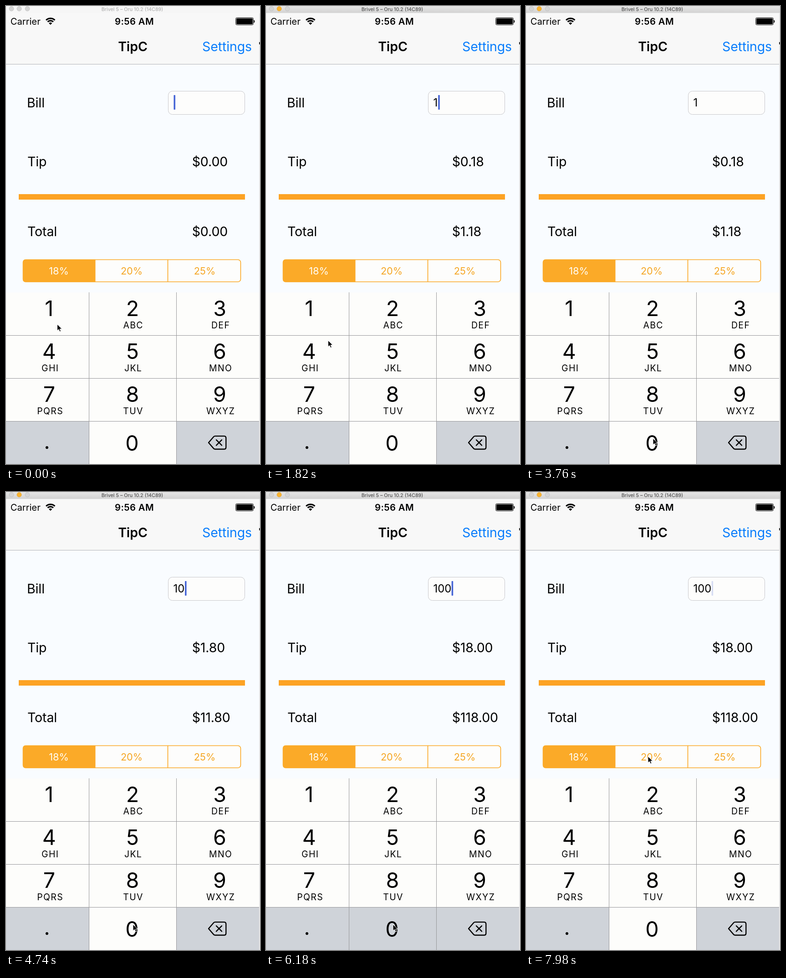
Animation, 558 px wide and 1003 px high, one loop 8000 ms. Source, as an HTML page:

```html
<!DOCTYPE html>
<html lang="en">
<head>
<meta charset="utf-8">
<title>Tip calculator</title>
<style>
  html, body { margin: 0; width: 100%; height: 100%; overflow: hidden; background: #f9fcff; }
  svg { display: block; font-family: Inter, Roboto, sans-serif; }
  .label { font-size: 28.5px; letter-spacing: -.1px; }
  .status { font-size: 20.2px; }
  .mid { text-anchor: middle; }
  .bold { font-weight: 600; }
  .segment { font-size: 21.7px; fill: #f5a623; text-anchor: middle; }
  .digit { font-size: 46.5px; text-anchor: middle; }
  .letters { font-size: 19.4px; letter-spacing: 1.4px; text-anchor: middle; }
</style>
</head>
<body>
<svg width="558" height="1003" viewBox="0 0 558 1003">
  <defs>
    <linearGradient id="chrome" x2="0" y2="1">
      <stop stop-color="#e6e6e6"/><stop offset="1" stop-color="#d2d2d2"/>
    </linearGradient>
  </defs>
  <rect width="558" height="1003" fill="#f9fcff"/>

  <!-- window title bar -->
  <rect id="bar" width="558" height="15.5"/>
  <g fill="#d4d4d4" stroke="#bdbdbd" stroke-width=".8">
    <circle cx="12" cy="6" r="5"/><circle id="light" cx="29" cy="6" r="5"/><circle cx="47" cy="6" r="5"/>
  </g>
  <text id="title" class="mid" x="277.5" y="10.5" font-size="10.8">Brivel 5 – Oru 10.2 (14C89)</text>

  <!-- status and navigation -->
  <rect y="15.5" width="558" height="111.5" fill="#f8f8f8"/>
  <rect y="127" width="556" height="1" fill="#b2b2b6"/>
  <text class="status" x="9.7" y="41">Carrier</text>
  <path d="M88 31A14 14 0 0 1 107.4 31M91.5 34.7A8.8 8.8 0 0 1 103.9 34.7" fill="none" stroke="#000" stroke-width="3.1"/>
  <path d="M97.7 41.3L94 37.5A5.2 5.2 0 0 1 101.4 37.5Z"/>
  <text class="status mid bold" x="282" y="41" letter-spacing=".4">9:56 AM</text>
  <rect x="504.5" y="25.5" width="39" height="16" rx="3" fill="none" stroke="#000"/>
  <rect x="506" y="27" width="36" height="13" rx="1.5"/>
  <path d="M545 31Q547.4 33.5 545 36.5Z" stroke="#000"/>
  <text class="label mid bold" x="278.5" y="99">TipC</text>
  <text class="label" x="431" y="99" fill="#087dfc">Settings</text>

  <!-- form -->
  <text class="label" x="46" y="222">Bill</text>
  <text class="label" x="47" y="350.5">Tip</text>
  <text class="label" x="47" y="503.5">Total</text>
  <rect x="356.5" y="186.5" width="168" height="51" rx="9" fill="#fdfdfc" stroke="#c8c8cc"/>
  <text id="bill" x="367.5" y="220" font-size="23.8"></text>
  <rect id="caret" y="195" width="3.6" height="32" rx="1" fill="#4867d6"/>
  <text id="tip" class="label" x="408.7" y="350.5"></text>
  <text id="total" class="label" x="408.7" y="503.5"></text>
  <rect x="28" y="412" width="497" height="12" fill="#fda324"/>

  <!-- percentage choice -->
  <rect x="37.5" y="555.5" width="478" height="48.5" rx="6" fill="#fdfdfc" stroke="#fbaa28" stroke-width="1.7"/>
  <path d="M196.5 555H43Q37 555 37 561V598.5Q37 604.5 43 604.5H196.5Z" fill="#fbaa28"/>
  <path d="M355.5 556V604" stroke="#fbaa28" stroke-width="1.7"/>
  <text class="segment" x="116" y="588" style="fill:#fffdf6">18%</text>
  <text class="segment" x="276" y="588">20%</text>
  <text class="segment" x="436.5" y="588">25%</text>

  <g id="pad"></g>
  <g fill="none" stroke="#000" stroke-width="2.4" stroke-linejoin="round" stroke-linecap="round">
    <path d="M445 956.2L456 943.5Q457.4 941.9 459.5 941.9H479Q483.3 941.9 483.3 946.2V966.2Q483.3 970.5 479 970.5H459.5Q457.4 970.5 456 968.9Z"/>
    <path d="M462 950.2L474 962.2M474 950.2L462 962.2"/>
  </g>
  <rect x="556" y="16" width="2" height="987" fill="#e9e9e9"/>
  <rect x="556" y="79" width="2" height="5" fill="#333"/>

  <path id="cursor" d="M0 0V14L3.3 11L5.6 16.2L8 15.2L5.8 10.2H10.3Z" stroke="#fff"/>
</svg>
<script>
const $ = id => document.getElementById(id);
const LOOP = 8000, WHITE = '#fdfdfb', GREY = '#cfd3d9';

// Keypad: column edges, then one entry per key
const edges = [0, 182, 374, 556], digitX = [94.8, 278, 469.5], lettersX = [97.2, 279.6, 471.6];
const keys = [['1', ''], ['2', 'ABC'], ['3', 'DEF'], ['4', 'GHI'], ['5', 'JKL'], ['6', 'MNO'],
  ['7', 'PQRS'], ['8', 'TUV'], ['9', 'WXYZ'], ['.', ''], ['0', ''], ['', '']];
let pad = '';
keys.forEach(([digit, letters], i) => {
  const c = i % 3, r = (i - c) / 3, y = r * 94;
  const fill = digit === '.' || !digit ? GREY : WHITE;
  const x = digit === '.' ? 90 : digitX[c] - (r === 3 ? 1 : 0);
  pad += `<rect id="key${digit}" x="${edges[c]}" y="${627.5 + y}" width="${edges[c + 1] - edges[c]}" height="94" fill="${fill}"/>
    <text class="digit" x="${x}" y="${r === 3 ? (digit === '.' ? 970 : 974) : 679 + y}">${digit}</text>
    <text class="letters" x="${lettersX[c]}" y="${706 + y}">${letters}</text>`;
});
pad += '<path d="M0 721.5H556M0 815.5H556M0 909.5H556M182.5 627V1003M374.5 627V1003" stroke="#97979a" fill="none"/>';
$('pad').innerHTML = pad;

// All moments below are ticks; three ticks last 20, 20 and 100 ms
const focusAt = 10;
const presses = [
  { key: '1', down: 12, type: 16, up: 28 },
  { key: '0', down: 85, type: 88, up: 96 },
  { key: '0', down: 120, type: 124, up: 138 }];
const moves = [
  { from: 35, to: 56, x: 279, y: 944 },
  { from: 62, to: 70, x: 279, y: 947 },
  { from: 144, to: 167, x: 268, y: 579 }];
const caretX = [368.4, 378.2, 393, 407.6];

function tickAt(ms) {
  const u = ms + 20, r = u % 140;
  return 3 * Math.floor(u / 140) + (r < 20 ? 0 : r < 40 ? 1 : 2);
}
const ramp = (n, from, to) => Math.min(1, Math.max(0, (n - from) / (to - from)));
const ease = p => p * p * (3 - 2 * p);

function draw(now) {
  const n = tickAt(now % LOOP);

  const active = n >= focusAt;
  $('bar').setAttribute('fill', active ? 'url(#chrome)' : '#f6f6f6');
  $('title').setAttribute('fill', active ? '#3c3c3c' : '#a8a8a8');
  $('light').setAttribute('fill', active ? '#f9b32f' : '#d4d4d4');
  $('light').setAttribute('stroke', active ? '#dfa032' : '#bdbdbd');

  const typed = presses.filter(p => n >= p.type);
  const bill = typed.map(p => p.key).join('');
  $('bill').textContent = bill;
  $('tip').textContent = '$' + (bill * .18).toFixed(2);
  $('total').textContent = '$' + (bill * 1.18).toFixed(2);

  const idle = typed.length ? n - typed[typed.length - 1].type : 0;
  $('caret').setAttribute('x', caretX[bill.length]);
  $('caret').setAttribute('opacity', 1 - ramp(idle, 38.5, 50.5) + ramp(idle, 66, 78));

  for (const key of ['0', '1']) {
    const held = presses.some(p => p.key === key && n >= p.down && n < p.up);
    $('key' + key).setAttribute('fill', held ? GREY : WHITE);
  }

  let x = 112.5, y = 697;
  for (const m of moves) {
    const p = ease(ramp(n, m.from, m.to));
    x += (m.x - x) * p;
    y += (m.y - y) * p;
  }
  $('cursor').setAttribute('transform', `translate(${x} ${y})`);
}

function loop() {
  draw(performance.now());
  requestAnimationFrame(loop);
}
loop();
</script>
</body>
</html>
```
